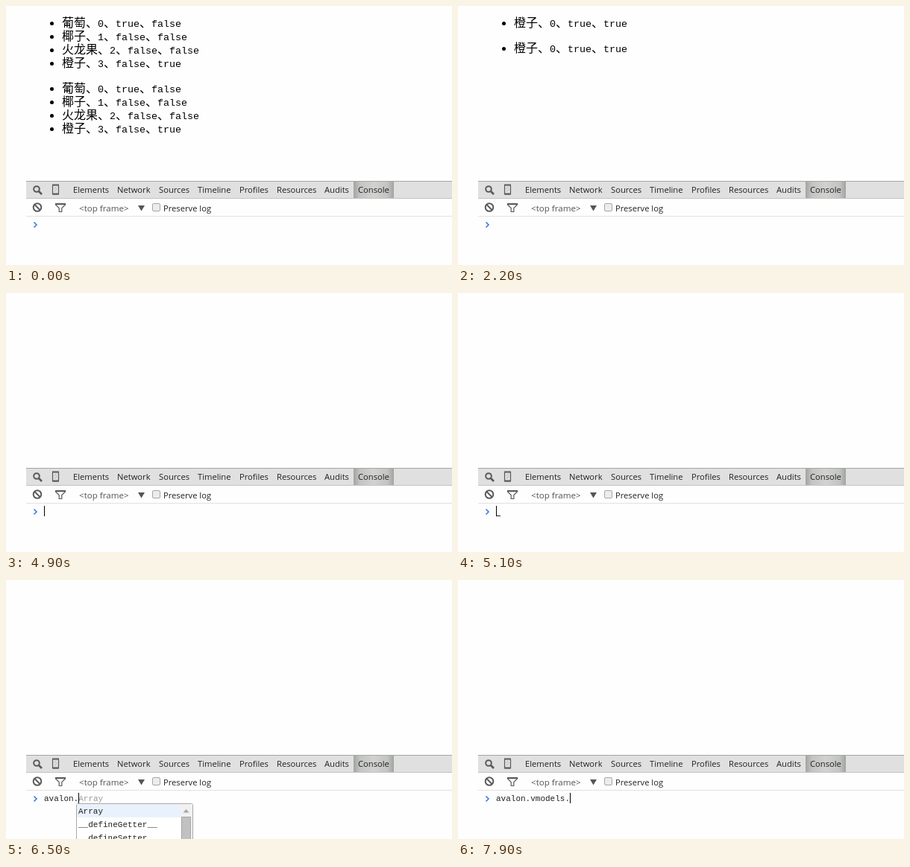
An HTML page for the animation above (8 s loop, 598 by 348 pixels).

```html
<!DOCTYPE html>
<html lang="zh-CN">
<head>
<meta charset="utf-8">
<title>List and console</title>
<style>
  html, body { margin: 0; width: 100%; height: 100%; overflow: hidden; background: #fefefe; }
  svg { display: block; }
  text { white-space: pre; }
  .list { font: 300 16px "Noto Sans CJK SC", "Noto Sans CJK JP", "Noto Sans CJK", sans-serif; }
  .list .latin { font: 13.333px "Liberation Mono", monospace; }
  .ui { font: 11.2px "Open Sans", "Noto Sans", sans-serif; fill: #222; }
  .mono { font: 11px "Liberation Mono", monospace; fill: #222; }
  .hint { fill: #999; }
  .ime { font: 13px "Noto Sans CJK SC", "Noto Sans CJK JP", sans-serif; fill: #333; }
  .icon { fill: none; stroke: #5a5a5a; stroke-width: 2; }
</style>
</head>
<body>
<svg width="598" height="348" viewBox="0 0 598 348">
  <defs>
    <linearGradient id="tab">
      <stop offset="0" stop-color="#a2a4a2"/>
      <stop offset=".16" stop-color="#c3c5c2"/>
      <stop offset=".5" stop-color="#d2d2d0"/>
      <stop offset=".84" stop-color="#c3c5c2"/>
      <stop offset="1" stop-color="#a2a4a2"/>
    </linearGradient>
  </defs>

  <g id="lists" class="list"></g>

  <rect x="27" y="235" width="571" height="24" fill="#e0e0e0"/>
  <path d="M27 235.5H598" stroke="#a5a5a5"/>
  <path d="M27 258.5H598" stroke="#c4c4c4"/>
  <path d="M27 282.5H598" stroke="#e2e2e2"/>
  <rect x="466" y="236" width="54" height="22" fill="url(#tab)"/>
  <g id="tabs" class="ui"></g>

  <g class="icon">
    <circle cx="41" cy="246" r="3.8"/>
    <path d="M44 249L48 253" stroke-width="2.6"/>
    <rect x="62.5" y="240.5" width="8" height="12.5" rx="1" stroke-width="1.2"/>
    <path d="M62 240.5H71M62 252.5H71" stroke-width="1.8"/>
    <path d="M64.5 246L67.5 242.5M65 249.5L68.5 245.5" stroke="#aaa" stroke-width=".8"/>
    <circle cx="42" cy="270.5" r="5.3"/>
    <path d="M38.5 267L45.5 274"/>
    <path d="M66.5 265.5H79.5V267L74.8 271.5V276.5H71.2V271.5L66.5 267Z" stroke-width="1.2"/>
    <path d="M67 266.6H79" stroke-width="1.2"/>
  </g>
  <text class="ui" x="98" y="276" style="font-size:11.6px;fill:#555">&lt;top frame&gt;</text>
  <path d="M177 268H186L181.5 275.5Z" fill="#555"/>
  <rect x="196.5" y="265.5" width="10" height="10" rx="1.5" fill="#ececec" stroke="#a6a6a6"/>
  <text class="ui" x="211" y="276">Preserve log</text>

  <path d="M37.5 290.5L41 294L37.5 297.5" fill="none" stroke="#3b78e7" stroke-width="1.6"/>
  <g id="prompt" class="mono"></g>
</svg>

<script>
const LOOP = 8000, CHAR = 6.6, LEFT = 51;
const $ = id => document.getElementById(id);
const rect = (x, y, w, h, attrs) => `<rect x="${x}" y="${y}" width="${w}" height="${h}" ${attrs}/>`;
const label = (x, y, s, cls = "") => `<text x="${x}" y="${y}" class="${cls}">${s}</text>`;

const tabs = { Elements: 90, Network: 149, Sources: 205, Timeline: 257,
               Profiles: 313, Resources: 363, Audits: 427, Console: 472 };
$("tabs").innerHTML = Object.entries(tabs).map(([s, x]) => label(x, 251, s)).join("");

// [start, fruits]
const lists = [
  [0, ["葡萄", "椰子", "火龙果", "橙子"]],
  [500, ["葡萄", "火龙果", "橙子"]],
  [1300, ["葡萄", "橙子"]],
  [2200, ["橙子"]],
  [3200, []]
];

const all = ["Array", "__defineGetter__", "__defineSetter__"];
const withV = ["valueOf", "version", "vmodels"];

// [start, state]
const prompts = [
  [0, {}],
  [4100, { caret: true }],
  [4500, {}],
  [4900, { caret: true }],
  [5000, { caret: true, underline: true, ime: true }],
  [5100, { caret: true, underline: true }],
  [5200, { caret: true }],
  [5500, {}]
];
const type = (start, text, extra) => prompts.push([start, { caret: true, text, ...extra }]);
[..."avalon"].forEach((c, i) => type(5900 + i * 100, "avalon".slice(0, i + 1)));
type(6500, "avalon.", { hint: "Array", menu: all, scroll: true });
type(6700, "avalon.v", { menu: all, scroll: true });
type(6800, "avalon.v", { hint: "alueOf", menu: withV });
type(6900, "avalon.vm", { hint: "odels", menu: withV });
[..."models"].forEach((c, i) =>
  type(7000 + i * 100, "avalon.v" + "models".slice(0, i + 1), { hint: "models".slice(i + 1) }));
type(7900, "avalon.vmodels.");

function drawLists(fruits) {
  const row = (name, i, top) => {
    const y = top + i * 18;
    const parts = [name, i, i === 0, i === fruits.length - 1].join("、")
      .replace(/[\w]+/g, s => `<tspan class="latin">${s}</tspan>`);
    return `<circle cx="61.5" cy="${y - 4.5}" r="2.5"/>` + label(75, y, parts);
  };
  const second = 28 + fruits.length * 18 + 16;
  return [28, second].map(top => fruits.map((f, i) => row(f, i, top)).join("")).join("");
}

function drawMenu(items, scroll) {
  const w = scroll ? 156 : 62;
  let out = rect(94.5, 300.5, w, 60, 'rx="2" fill="#fff" stroke="#a9a9a9"') +
    rect(95, 301, scroll ? 139 : w - 1, 18, 'fill="#e9f1fd"');
  if (scroll) {
    out += rect(234, 301, 16, 47, 'fill="#f1f1f1"') +
      '<path d="M237.5 312.5H245.5L241.5 308Z" fill="#a5a5a5"/>' +
      rect(235.5, 318.5, 12, 40, 'fill="#c1c1c1" stroke="#a8a8a8"');
  }
  return out + items.map((s, i) => label(97, 314 + i * 18, s)).join("");
}

function drawIme() {
  return rect(51.5, 303.5, 249, 44, 'fill="#fff" stroke="#d0d0d0"') +
    label(58, 319, "a", "ime") + label(58, 340, "1.啊  2.阿  3.呵  4.吖  5.嗄", "ime");
}

function drawPrompt({ text = "", hint = "", caret, underline, ime, menu, scroll }) {
  const end = LEFT + text.length * CHAR;
  return label(LEFT, 297, text) + label(end, 297, hint, "hint") +
    (menu ? drawMenu(menu, scroll) : "") +
    (ime ? drawIme() : "") +
    (underline ? rect(LEFT, 299, 6, 1, "") : "") +
    (caret ? rect(Math.floor(end), 286, 1, 14, 'fill="#000"') : "");
}

const at = (steps, t) => steps.reduce((now, s) => s[0] <= t ? s : now);
const shown = {};
function show(id, step, draw) {
  if (shown[id] === step) return;
  shown[id] = step;
  $(id).innerHTML = draw(step[1]);
}

function tick() {
  const t = performance.now() % LOOP;
  show("lists", at(lists, t), drawLists);
  show("prompt", at(prompts, t), drawPrompt);
  requestAnimationFrame(tick);
}
tick();
</script>
</body>
</html>
```
